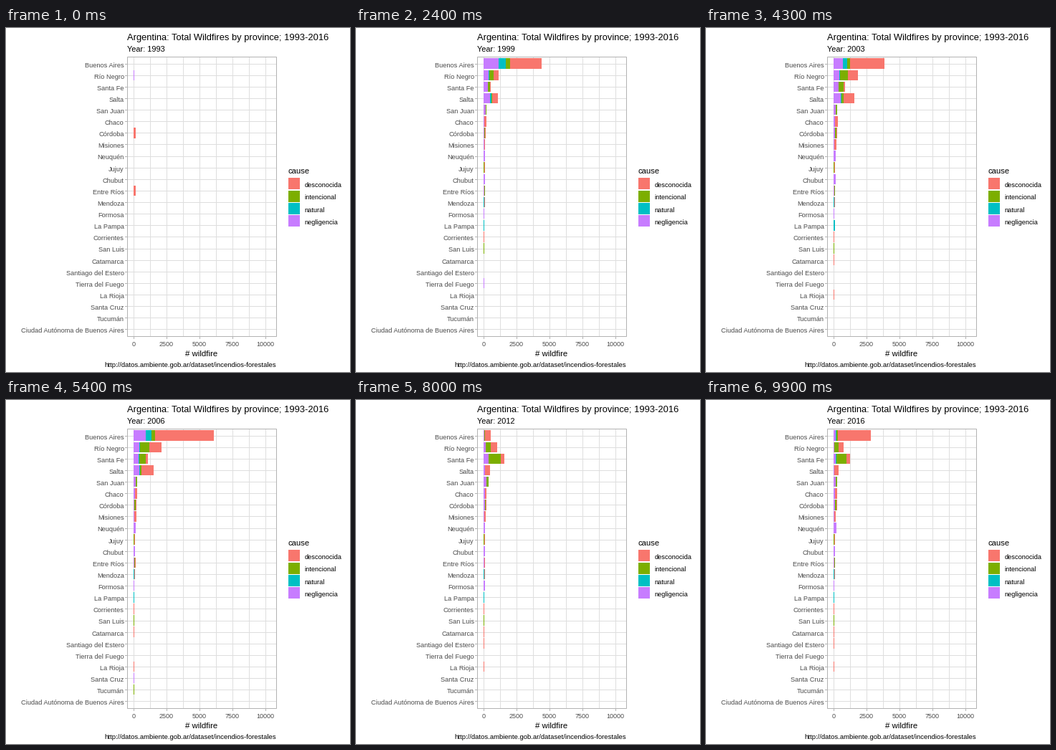
A matplotlib script for the animation above (10 s loop, 480 by 480 pixels).

```python
import numpy as np
import matplotlib.pyplot as plt
from matplotlib.animation import FuncAnimation
from matplotlib.collections import PolyCollection
from matplotlib.patches import Rectangle

SIZE, DPI = 480, 72
FRAMES = 100
YEARS = np.arange(1993, 2017)
LEFT, RIGHT, TOP, BOTTOM = 169, 377, 40, 430
X0, X_SCALE = 178, 190 / 10300
ROW_STEP = (BOTTOM - TOP) / 24.2
ROW0 = TOP + .6 * ROW_STEP
GREY, GRID, AXIS_TEXT = "#B3B3B3", "#DEDEDE", "#4D4D4D"

# stacking order, from the axis outwards
CAUSES = {"negligencia": "#C77CFF", "natural": "#00BFC4",
          "intencional": "#7CAE00", "desconocida": "#F8766D"}
NEG, NAT, INT, DES = range(4)

# usual causes of each province, most frequent first
PROVINCES = {
    "Buenos Aires": (DES, NEG), "Río Negro": (DES, NEG),
    "Santa Fe": (INT, NEG), "Salta": (DES, NEG), "San Juan": (NEG, INT),
    "Chaco": (DES, NEG), "Córdoba": (INT, NEG, DES), "Misiones": (DES, NEG),
    "Neuquén": (NEG,), "Jujuy": (DES, INT), "Chubut": (NEG,),
    "Entre Ríos": (NEG, INT, DES), "Mendoza": (NAT, DES), "Formosa": (NEG,),
    "La Pampa": (NAT,), "Corrientes": (DES,), "San Luis": (INT,),
    "Catamarca": (DES,), "Santiago del Estero": (DES,),
    "Tierra del Fuego": (NEG,), "La Rioja": (DES, NEG), "Santa Cruz": (NEG,),
    "Tucumán": (INT,), "Ciudad Autónoma de Buenos Aires": (),
}
NAMES = list(PROVINCES)

# yearly totals at turning points, with the cause mix at both ends
LEADERS = {
    "Buenos Aires": (
        {1993: 0, 1996: 530, 1997: 990, 1998: 5000, 2000: 2650, 2002: 2900,
         2003: 3850, 2004: 8400, 2005: 5800, 2006: 6340, 2008: 10300,
         2009: 2940, 2011: 550, 2012: 530, 2015: 900, 2016: 2820},
        (.37, .18, .08, .37), (.06, .01, .04, .89)),
    "Río Negro": (
        {1993: 40, 1996: 550, 2000: 1500, 2006: 2170, 2009: 1790, 2012: 930,
         2016: 760},
        (.45, .07, .2, .28), (.1, 0, .4, .5)),
    "Santa Fe": (
        {1993: 0, 1996: 490, 2000: 620, 2006: 1150, 2009: 930, 2012: 1680,
         2016: 1250},
        (.85, .02, .02, .11), (.15, .02, .63, .2)),
    "Salta": (
        {1993: 0, 1996: 110, 2000: 1630, 2006: 1520, 2009: 880, 2012: 440,
         2016: 380},
        (.7, .1, .05, .15), (.1, 0, .1, .8)),
}

# provinces that only report during some years
ACTIVE = {"San Juan": (1998, 2016), "Mendoza": (1998, 2016),
          "La Pampa": (1998, 2016), "Catamarca": (2003, 2016),
          "Santiago del Estero": (2007, 2016), "Tierra del Fuego": (1996, 2001),
          "La Rioja": (2000, 2016), "Santa Cruz": (2004, 2007),
          "Tucumán": (2005, 2009)}

# single bad seasons: province, first and last year, cause, fires
SEASONS = [("Córdoba", 1993, 1993, DES, 160),
           ("Entre Ríos", 1993, 1993, DES, 160),
           ("Catamarca", 1996, 1997, INT, 870),
           ("Tucumán", 2008, 2009, NEG, 880)]


def leader_fires(totals, first_mix, last_mix):
    total = np.interp(YEARS, list(totals), list(totals.values()))
    t = np.sqrt(np.clip((YEARS - 1996) / 20, 0, 1))[:, None]
    mix = (1 - t) * np.array(first_mix) + t * np.array(last_mix)
    return total[:, None] * mix


def minor_fires(i, name, rng):
    """Fewer fires further down the chart, growing through the nineties."""
    causes = PROVINCES[name]
    first, last = ACTIVE.get(name, (YEARS[0], YEARS[-1]))
    total = 40 + 260 * np.exp(-(i - 4) / 5)
    total = total * np.clip((YEARS - YEARS[0]) / 7, 0, 1)
    total *= (YEARS >= first) & (YEARS <= last)
    weights = np.arange(len(causes), 0, -1)
    fires = np.zeros((len(YEARS), 4))
    for cause, weight in zip(causes, weights):
        noise = rng.uniform(.7, 1.3, len(YEARS))
        fires[:, cause] = total * noise * weight / weights.sum()
    return fires


def yearly_fires():
    rng = np.random.default_rng(7)
    fires = np.zeros((len(YEARS), len(NAMES), 4))
    for i, name in enumerate(NAMES):
        if name in LEADERS:
            fires[:, i] = leader_fires(*LEADERS[name])
        else:
            fires[:, i] = minor_fires(i, name, rng)
    for name, first, last, cause, count in SEASONS:
        span = slice(first - YEARS[0], last - YEARS[0] + 1)
        fires[span, NAMES.index(name)] = 0
        fires[span, NAMES.index(name), cause] = count
    fires[fires < 15] = 0
    return fires


FIRES = yearly_fires()
ENDS = FIRES.cumsum(axis=2)
STARTS = ENDS - FIRES
KEYS = np.round(np.linspace(0, FRAMES - 1, len(YEARS))).astype(int)


def row_y(i):
    return ROW0 + i * ROW_STEP


def to_x(value):
    return round(X0 + value * X_SCALE)


fig = plt.figure(figsize=(SIZE / DPI, SIZE / DPI), dpi=DPI, facecolor="white")
ax = fig.add_axes([0, 0, 1, 1])
ax.set(xlim=(0, SIZE), ylim=(SIZE, 0))
ax.axis("off")


def vline(x, y1, y2, color, z):
    ax.plot([x + .5] * 2, [y1, y2], color=color, lw=1, zorder=z, snap=False,
            solid_capstyle="butt")


def hline(y, x1, x2, color, z):
    ax.plot([x1, x2], [y + .5] * 2, color=color, lw=1, zorder=z, snap=False,
            solid_capstyle="butt")


def label(x, y, text, size, color="black", ha="left"):
    return ax.text(x, y, text, fontsize=size, color=color, ha=ha,
                   va="baseline", family="Liberation Sans")


for value in range(0, 10001, 1250):
    x = to_x(value)
    vline(x, TOP, BOTTOM, GRID, 1)
    if value % 2500 == 0:
        vline(x, BOTTOM + 1, BOTTOM + 4, GREY, 4)
        label(x - .3, 444, str(value), 9, AXIS_TEXT, "center")

for i, name in enumerate(NAMES):
    y = round(row_y(i))
    hline(y, LEFT, RIGHT, GRID, 1)
    hline(y, LEFT - 3, LEFT, GREY, 4)
    label(164.7, round(row_y(i) + 4.9), name, 9.27, AXIS_TEXT, "right")

ax.add_patch(Rectangle((LEFT + .5, TOP + .5), RIGHT - LEFT, BOTTOM - TOP,
                       fill=False, ec=GREY, lw=1, snap=False, zorder=3))

label(169, 17, "Argentina: Total Wildfires by province; 1993-2016", 12.9)
year_text = label(169, 33, "", 11)
label(273, 458, "# wildfire", 11.4, ha="center")
label(377.5, 473, "http://datos.ambiente.gob.ar/dataset/incendios-forestales",
      9.45, ha="right")

label(394, 203, "cause", 11.2)
for i, cause in enumerate(sorted(CAUSES)):
    y = round(209.4 + 17.28 * i)
    ax.add_patch(Rectangle((394, y), 16, 16, fc=CAUSES[cause], lw=0,
                           antialiased=False))
    label(416.7, round(222 + 17.28 * i), cause, 9.3)

bars = []
for color in CAUSES.values():
    layer = PolyCollection([], facecolors=color, linewidths=0,
                           antialiaseds=False, zorder=2)
    ax.add_collection(layer, autolim=False)
    bars.append(layer)


def pose(n):
    """Bar edges at step n, and which bars exist there."""
    a = np.searchsorted(KEYS, n, side="right") - 1
    if KEYS[a] == n:
        return STARTS[a], ENDS[a], FIRES[a] > 0
    t = (n - KEYS[a]) / (KEYS[a + 1] - KEYS[a])
    lo = STARTS[a] * (1 - t) + STARTS[a + 1] * t
    hi = ENDS[a] * (1 - t) + ENDS[a + 1] * t
    return lo, hi, (FIRES[a] > 0) & (FIRES[a + 1] > 0)


def draw(n):
    lo, hi, shown = pose(n)
    half = .45 * ROW_STEP
    for k, layer in enumerate(bars):
        boxes = []
        for i in np.flatnonzero(shown[:, k]):
            x1 = to_x(lo[i, k])
            x2 = max(to_x(hi[i, k]), x1 + 1)
            y1, y2 = round(row_y(i) - half), round(row_y(i) + half)
            boxes.append([(x1, y1), (x2, y1), (x2, y2), (x1, y2)])
        layer.set_verts(boxes)
    year = round(YEARS[0] + (len(YEARS) - 1) * n / (FRAMES - 1))
    year_text.set_text(f"Year: {year}")
    return [*bars, year_text]


anim = FuncAnimation(fig, draw, frames=FRAMES, interval=100, repeat=True,
                     repeat_delay=0, blit=False)
plt.show()
```
